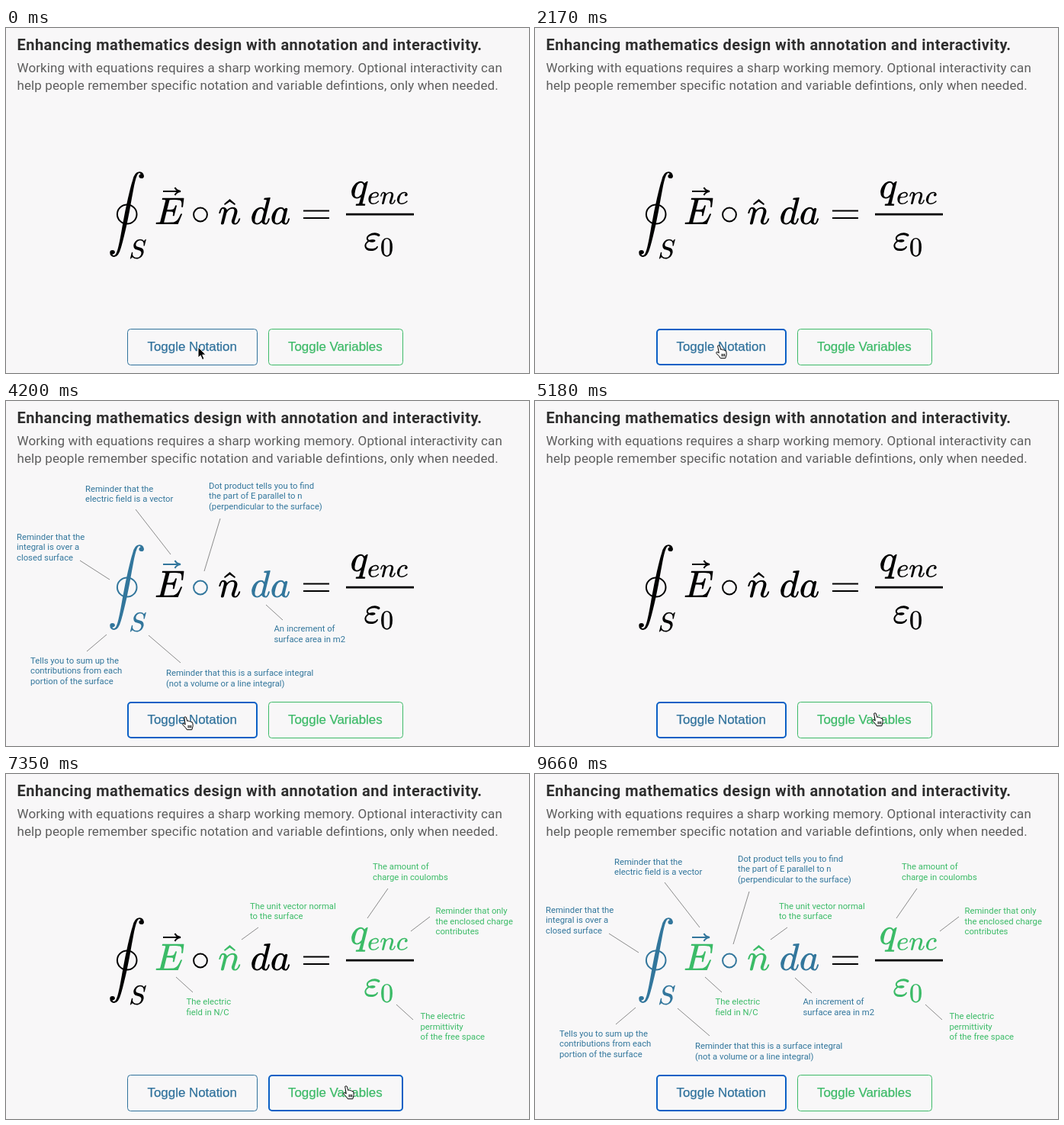
These frames come from a looping animation (686x452 px, 9730 ms). An HTML page:

```html
<!DOCTYPE html>
<html lang="en">
<head>
<meta charset="utf-8">
<title>Annotated equation</title>
<style>
html, body { margin: 0; width: 100%; height: 100%; overflow: hidden; background: #f8f7f8; }
svg { display: block; --n: #000; --v: #000; }
svg.n { --n: #32769c; }
svg.v { --v: #3bbb67; }
text { white-space: pre; }
.title { font: bold 20px Roboto, sans-serif; letter-spacing: .475px; fill: #2e2e2e; }
.lead { font: 17px Roboto, sans-serif; letter-spacing: .1px; fill: #5d5d5d; }
.notes { font: 11.3px Roboto, sans-serif; visibility: hidden; }
.notes path { stroke: #8b8b8b; fill: none; }
svg.n .notes.n, svg.v .notes.v { visibility: visible; }
.notes.n { fill: #32769c; }
.notes.v { fill: #3bbb67; }
.eq .n { fill: var(--n); }
.eq .v { fill: var(--v); }
.eq .line { fill: none; stroke: var(--n); stroke-width: 2; }
.button { font: 16.9px "Liberation Sans", Arial, sans-serif; }
.button rect { width: var(--w); height: 47px; fill: none; stroke: currentColor; }
.button text { fill: currentColor; stroke: currentColor; stroke-width: .25; }
.button.focus rect { x: .5px; y: .5px; width: calc(var(--w) - 1px); height: 46px; stroke: #0b60c5; stroke-width: 2; }
</style>
</head>
<body>
<svg id="stage" width="686" height="452" viewBox="0 0 686 452">
  <text class="title" x="14.5" y="29">Enhancing mathematics design with annotation and interactivity.</text>
  <text class="lead" x="14.5" y="58">Working with equations requires a sharp working memory. Optional interactivity can</text>
  <text class="lead" x="14.5" y="81">help people remember specific notation and variable defintions, only when needed.</text>

  <g class="eq">
    <g id="glyphs"></g>
    <ellipse class="line" cx="158.7" cy="244" rx="12.8" ry="12.6"/>
    <path class="line" d="M206 214H228M221.5 209Q223.5 213 229 214Q223.5 215 221.5 219"/>
    <circle class="line" cx="255" cy="244.5" r="8.9"/>
    <path class="v" d="M286 230.5L293.5 224L301 230.5L300 232L293.5 227.5L287 232Z"/>
    <path d="M390 238.500h34v2h-34zM390 248h34v2h-34zM446 242.700h89v2.700h-89z"/>
  </g>

  <g class="notes n" id="notation"></g>
  <g class="notes v" id="variables"></g>

  <g class="button" id="b0" color="#30729c" transform="translate(159.5 394.5)" style="--w: 170px">
    <rect rx="4"/>
    <text x="26" y="28.500">Toggle Notation</text>
  </g>
  <g class="button" id="b1" color="#3dba68" transform="translate(344.5 394.5)" style="--w: 176px">
    <rect rx="4"/>
    <text x="25.500" y="28.500">Toggle Variables</text>
  </g>

  <circle id="ring" r="26.500" fill="#7fb0f018" stroke="#78a9e8" stroke-width="2.500"/>
  <g id="cursor" stroke-linejoin="round">
    <path id="arrow" fill="#000" stroke="#fff" d="M0 0V14L3.200 11L5.500 16.500L8 15.500L5.700 10.200H10Z"/>
    <g id="hand" stroke="#000" stroke-width="1.100" transform="translate(0 1) scale(.9)">
      <path fill="#fff" d="M-1.500 .5Q0 -1 1.500 .5L3 6Q4.500 4.500 6 6.500Q7.500 5.500 8.700 7.500Q10.500 6.500 11 9L11.300 13L9.800 18.500H2.500Q1 15 -3.500 11.500Q-4 8.500 -1 10L.3 11Z"/>
      <path d="M4.500 12V16M6.500 12V16M8.500 12V16"/>
    </g>
  </g>
</svg>
<script>
const $ = id => document.getElementById(id);

// Letter outlines, 1000 units per em, y up
const bowl = 'Q329 405 277 405Q242 405 210 374T160 293Q131 214 119 129L118 106Q118 61 136 44T179 26Q233 26 290 98L298 109L352 326Z';
const tail = 'Q374 26 402 26Q411 27 422 35Q443 55 463 131Q469 153 483 153H491Q506 153 503 129Q490 79 473 48T445 8T417 -8Q409 -10 393 -10Q359 -10 336 5T306 36L300 51Q233 -10 172 -10Q117 -10 75 30T33 157';
const shapes = {
  oint: 'M114 -798Q132 -824 165 -824Q195 -824 223 -764T275 -600T320 -391T362 -164Q439 292 523 655T645 1127Q695 1360 828 1360Q884 1360 912 1325T944 1245Q944 1183 877 1183Q812 1183 812 1243Q812 1280 858 1299Q840 1322 821 1322Q790 1322 764 1262T712 1098T667 889T625 662Q548 200 464 -157T342 -629Q280 -862 165 -862Q110 -862 83 -829T55 -747Q55 -685 120 -685Q187 -685 187 -745Q187 -782 114 -798Z',
  S: 'M308 24Q367 24 416 76T466 197Q466 260 414 284Q308 311 278 321T236 341Q176 383 176 462Q176 523 208 573T273 648Q302 673 343 688T407 704H425Q521 704 564 640L623 704Q645 707 645 698L585 459Q580 456 569 456Q549 456 549 465L553 520Q553 554 544 579T526 616T501 641Q465 662 419 662Q362 662 313 616T263 510Q263 480 278 458T319 427L456 390Q490 379 522 342T554 242Q554 216 546 186Q541 164 528 137T492 78T426 18T332 -20Q320 -22 298 -22Q199 -22 144 33L134 44L78 -18Q52 -28 52 -14L110 221Q112 227 130 227H143Q149 221 149 216L142 153Q144 114 160 87T203 47T255 29T308 24Z',
  E: 'M492 213Q472 213 472 226L482 285Q482 316 461 323T364 330H312L243 52Q243 46 334 46Q428 46 458 48T518 61Q567 77 599 117T670 248Q680 274 698 274Q718 274 718 261Q613 7 608 2Q605 0 322 0H133Q31 0 31 11Q34 41 42 43T65 46Q92 46 125 49Q139 52 144 61L285 622Q285 632 228 634H197Q187 642 203 680H757Q764 676 764 669L737 447Q735 440 717 440H705Q698 445 698 453L704 528Q704 558 697 578T678 609T643 625T596 632T532 634H485Q397 633 392 631Q388 629 386 622L324 377Q347 376 398 376Q464 376 489 391T534 472Q538 493 557 493Q575 492 577 483L508 216Q505 213 492 213Z',
  n: 'M21 287Q22 293 24 303T36 341T56 388T89 425T135 442Q171 442 195 424T225 390L232 367Q304 442 382 442Q436 442 469 415T503 336T465 179T427 52Q427 26 444 26Q482 26 505 65T540 145Q542 153 560 153Q580 153 580 145Q568 101 554 73T508 17T439 -10Q392 -10 371 17T350 73Q350 92 386 193T423 345Q423 404 379 404H374Q288 404 229 303L222 291L151 16Q138 -11 108 -11Q74 -11 74 17Q74 30 112 180T152 343L153 366Q153 405 129 405Q91 405 66 305Q60 278 41 278H27Q21 284 21 287Z',
  d: 'M366 683L511 694Q523 694 523 686L375 83L374 68' + tail + 'Q33 205 53 255T101 341Q148 398 195 420T280 442Q336 442 369 396L424 616Q424 629 417 632T378 637H357Q348 645 366 683ZM352 326' + bowl,
  a: 'M33 157Q33 258 109 349T280 441Q331 441 370 392Q386 422 416 422Q429 422 439 414T449 394L374 68' + tail + 'ZM352 326' + bowl,
  q: 'M33 157Q33 258 109 349T280 441Q340 441 372 389Q388 408 404 418Q438 442 450 442Q458 442 460 434L320 -139Q320 -147 365 -148H390Q398 -156 383 -194H157Q143 -193 143 -185Q149 -154 152 -151T172 -148Q220 -148 230 -141L279 32Q224 -10 172 -10Q117 -10 75 30T33 157ZM352 326' + bowl,
  e: 'M39 168Q39 225 58 272T107 350T174 402T244 433T307 442Q355 442 388 420T421 355Q421 265 310 237Q261 224 176 223L138 221Q125 160 125 128Q125 81 146 54T209 26T302 45T394 111Q403 121 406 121Q410 121 419 112T429 98T420 82T390 55T344 24T281 -1T205 -11Q126 -11 83 42T39 168ZM373 353Q367 405 305 405Q272 405 244 391T199 357T170 316T154 280L149 260H169Q282 260 327 284T373 353Z',
  c: 'M34 159Q34 268 120 355T306 442Q362 442 394 418T427 355Q427 326 408 306T360 285Q341 285 330 295T319 325T330 359T367 386Q355 404 306 404Q276 404 249 390Q228 381 206 359Q162 315 142 235T121 119Q121 73 147 50Q169 26 205 26Q321 26 394 111Q403 121 406 121Q410 121 419 112T429 98T420 83T391 55T346 25T282 0T202 -11Q127 -11 81 37T34 159Z',
  eps: 'M190 -22Q124 -22 76 11T27 107Q27 174 97 232L107 239L99 248Q76 273 76 304Q76 364 144 408T290 452H302Q360 452 405 421Q428 405 428 392Q428 381 417 369T391 356Q382 356 371 365T338 383T283 392Q217 392 167 368T116 308Q116 289 133 272Q142 263 157 264Q188 278 243 278Q308 278 308 247Q308 206 223 206Q177 206 142 219L132 212Q68 169 68 112Q68 39 201 39Q253 39 286 49T328 72T345 94T362 105Q376 103 376 88Q376 79 365 62T334 26T275 -8T190 -22Z',
  zero: 'M96 585Q152 666 249 666Q297 666 345 640T423 548Q460 465 460 320Q460 165 417 83Q397 41 362 16T301 -15T250 -22Q224 -22 198 -16T137 16T82 83Q39 165 39 320Q39 494 96 585ZM321 597Q291 629 250 629Q208 629 178 597Q153 571 145 525T137 333Q137 175 145 125T181 46Q209 16 250 16Q290 16 318 46Q347 76 354 130T362 333Q362 478 354 524T321 597Z'
};

const EM = 50.3, SUB = 35.4;
const glyph = (name, kind, x, y, em = EM) =>
  `<path class="${kind}" transform="translate(${x} ${y}) scale(${em / 1000} ${-em / 1000})" d="${shapes[name]}"/>`;
$('glyphs').innerHTML = [
  ['oint', 'n', 133.5, 256.6], ['S', 'n', 161, 301.7, SUB],
  ['E', 'v', 195, 257], ['n', 'v', 278.2, 257],
  ['d', 'n', 320.5, 257], ['a', 'n', 346.7, 257],
  ['q', 'v', 451.5, 223], ['e', 'v', 474, 230.5, SUB], ['n', 'v', 490.4, 230.5, SUB], ['c', 'v', 511.6, 230.5, SUB],
  ['eps', 'v', 469, 291], ['zero', 'v', 490.7, 298.6, SUB]
].map(g => glyph(...g)).join('');

// Each note: text position, leader line, lines of text
const note = ([x, y, leader, ...lines]) => `<path d="${leader}"/>` +
  lines.map((s, i) => `<text x="${x}" y="${y + i * 13.5}">${s}</text>`).join('');
$('notation').innerHTML = [
  [104, 118.5, 'M170 142L216 201', 'Reminder that the', 'electric field is a vector'],
  [266, 114.5, 'M281 154L260 223', 'Dot product tells you to find', 'the part of E parallel to n', '(perpendicular to the surface)'],
  [14, 181.5, 'M97 209L136 234', 'Reminder that the', 'integral is over a', 'closed surface'],
  [351.5, 302, 'M341 267L363 287', 'An increment of', 'surface area in m2'],
  [32, 343.5, 'M132 306L106 328', 'Tells you to sum up the', 'contributions from each', 'portion of the surface'],
  [210, 360, 'M187 307L229 343', 'Reminder that this is a surface integral', '(not a volume or a line integral)']
].map(note).join('');
$('variables').innerHTML = [
  [481, 125, 'M501 150L474 189', 'The amount of', 'charge in coulombs'],
  [320, 176.5, 'M331 201L309 217', 'The unit vector normal', 'to the surface'],
  [563.5, 183, 'M556 187L531 206', 'Reminder that only', 'the enclosed charge', 'contributes'],
  [236.5, 302, 'M223 266L245 286', 'The electric', 'field in N/C'],
  [543.5, 321, 'M512 302L534 322', 'The electric', 'permittivity', 'of the free space']
].map(note).join('');

const LOOP = 9730, STEP = 70;
const presses = [[2170, 0], [4270, 0], [5390, 1], [8050, 0]]; // time, button
const track = [[0, 252, 418], [840, 252, 418], [1750, 241, 415], [2730, 241, 415], [3500, 235, 413],
  [4550, 235, 413], [5040, 446, 408], [7420, 446, 408], [7980, 254, 414], [8330, 254, 414], [8680, 290, 325]];

function pointer(t) {
  const i = track.findIndex(p => p[0] > t);
  if (i < 0) return track.at(-1).slice(1);
  const [t0, x0, y0] = track[i - 1], [t1, x1, y1] = track[i];
  const u = (t - t0) / (t1 - t0), k = u * u * (3 - 2 * u);
  return [x0 + (x1 - x0) * k, y0 + (y1 - y0) * k];
}

function draw(now) {
  const t = Math.floor(now % LOOP / STEP) * STEP;
  const on = [false, false];
  let focus = -1, age = Infinity;
  for (const [start, button] of presses) {
    if (t < start) break;
    focus = button;
    age = t - start;
    if (age >= STEP) on[button] = !on[button];
  }
  $('stage').classList.toggle('n', on[0]);
  $('stage').classList.toggle('v', on[1]);
  [0, 1].forEach(i => $('b' + i).classList.toggle('focus', focus === i));

  const [x, y] = pointer(t);
  const at = `translate(${x} ${y})`;
  $('cursor').setAttribute('transform', at);
  $('cursor').style.opacity = t < 8960 ? 1 : 0;
  $('arrow').style.display = t < 140 ? '' : 'none';
  $('hand').style.display = t < 140 ? 'none' : '';
  $('ring').setAttribute('transform', at);
  $('ring').style.opacity = age < STEP ? 0 : Math.max(0, Math.min(1, (420 - age) / 210));
  requestAnimationFrame(draw);
}
requestAnimationFrame(draw);
</script>
</body>
</html>
```
